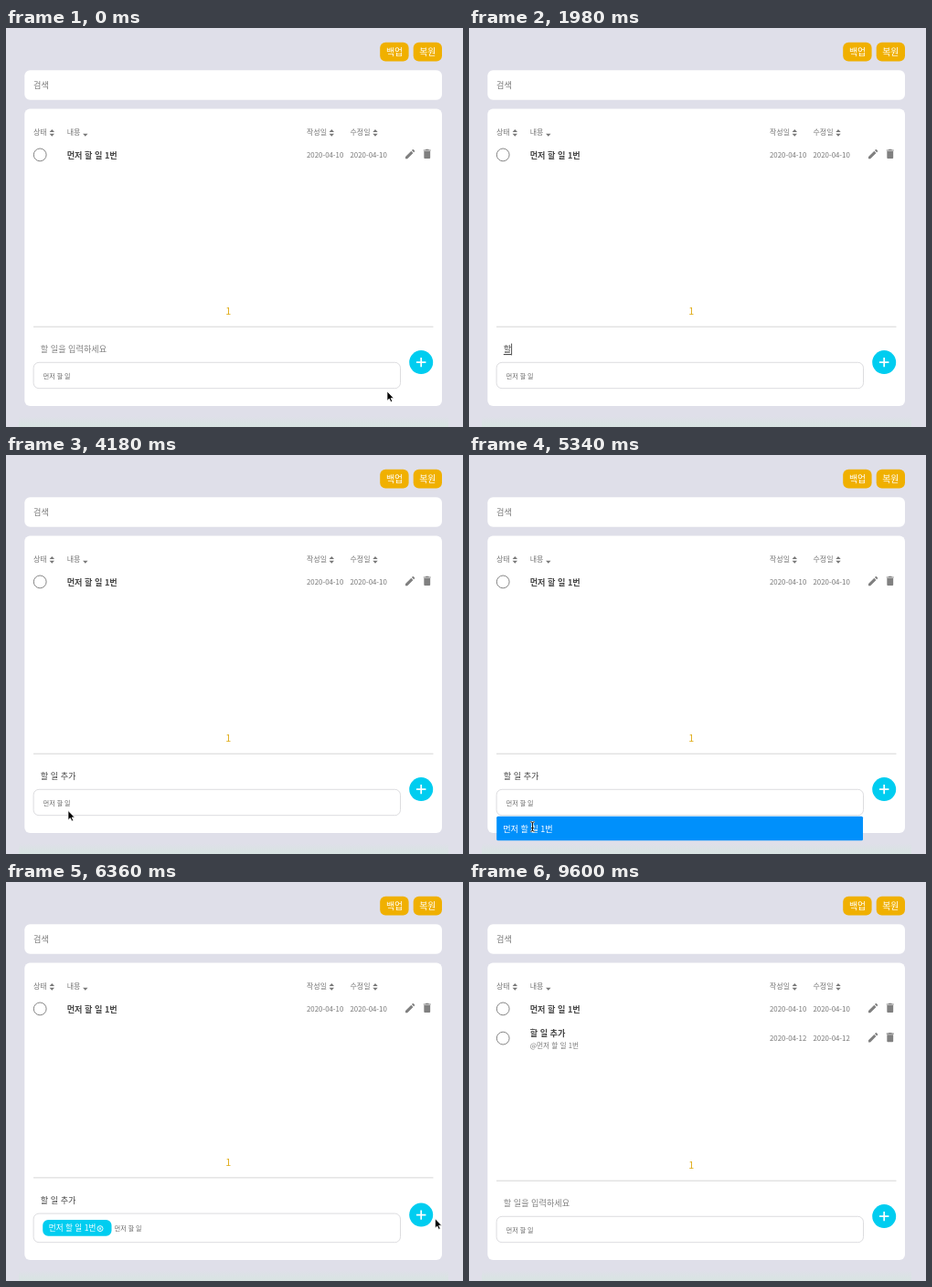
Write an HTML page that moves like this. It is 500 by 437 pixels and loops after 9820 ms.

```html
<!DOCTYPE html>
<html lang="ko">
<head>
<meta charset="utf-8">
<title>할 일</title>
<style>
html, body { margin: 0; width: 100%; height: 100%; overflow: hidden; background: #dfdfe9; }
svg { display: block; width: 100%; height: 100%; }
text { font-family: 'Noto Sans CJK KR', 'Noto Sans CJK', 'Noto Sans CJK JP', sans-serif; white-space: pre; }
</style>
</head>
<body>
<svg id="stage" viewBox="0 0 500 437"></svg>
<script>
const LOOP = 9820;
const CYAN = '#00cdf0', AMBER = '#f0b000', GRAY = '#777';
const stage = document.getElementById('stage');
const $ = id => document.getElementById(id);

// Text is placed by its left edge and vertical middle.
const text = (x, middle, size, content, fill = GRAY, extra = '') =>
  `<text x="${x}" y="${middle + size * 0.37}" font-size="${size}" fill="${fill}" ${extra}>${content}</text>`;
const box = (x, y, w, h, r, fill, extra = '') =>
  `<rect x="${x}" y="${y}" width="${w}" height="${h}" rx="${r}" fill="${fill}" ${extra}/>`;
const button = (x, w, label) =>
  box(x, 15.7, w, 20.8, 6, AMBER) + text(x + w / 2, 26.2, 9.8, label, '#fff', 'text-anchor="middle"');
const sortIcon = (x, both = true) =>
  `<path fill="${GRAY}" d="M${x - 2.7} 115.7h5.4l-2.7 3z${both ? `M${x - 2.7} 114.1h5.4l-2.7 -3z` : ''}"/>`;

const EDIT = 'M3 17.25V21h3.75L17.81 9.94l-3.75-3.75L3 17.25zM20.71 7.04c.39-.39.39-1.02 0-1.41l-2.34-2.34c-.39-.39-1.02-.39-1.41 0l-1.83 1.83 3.75 3.75 1.83-1.83z';
const TRASH = 'M6 19c0 1.1.9 2 2 2h8c1.1 0 2-.9 2-2V7H6v12zM19 4h-3.5l-1-1h-5l-1 1H5v2h14V4z';
const icon = (x, y, path) => `<path transform="translate(${x} ${y}) scale(.571)" fill="#808080" d="${path}"/>`;

function row(y, title, date, note) {
  return `<circle cx="37.2" cy="${y - 0.4}" r="6.9" fill="none" stroke="#858585"/>` +
    text(66.7, note ? y - 6 : y, 9.13, title, '#444', 'font-weight="700"') +
    (note ? text(66.7, y + 7.5, 7.7, note) : '') +
    text(329, y, 7.85, date) + text(376.5, y, 7.85, date) +
    icon(435.3, y - 8.1, EDIT) + icon(453.9, y - 8.2, TRASH);
}

stage.innerHTML = `
  <defs>
    <linearGradient id="fade" x2="0" y2="1">
      <stop offset="0" stop-color="#d8e4e2" stop-opacity="0"/>
      <stop offset="1" stop-color="#d8e4e2"/>
    </linearGradient>
  </defs>
  ${box(0, 0, 500, 437, 0, '#dfdfe9')}
  ${box(14, 425, 470, 12, 0, 'url(#fade)')}
  ${button(409.2, 31.4, '백업')}${button(445.7, 31.3, '복원')}
  ${box(20.3, 46.3, 456.7, 32.4, 6, '#fff')}
  ${text(30, 62.8, 9.13, '검색')}
  ${box(20.3, 88.5, 456.7, 325.5, 6, '#fff')}
  ${text(30, 114.5, 8, '상태')}${sortIcon(50.3)}
  ${text(66.7, 114.5, 8, '내용')}${sortIcon(86.8, false)}
  ${text(329, 114.5, 8, '작성일')}${sortIcon(356.3)}
  ${text(376.5, 114.5, 8, '수정일')}${sortIcon(404)}
  ${row(139.3, '먼저 할 일 1번', '2020-04-10')}
  <g id="added">${row(171.5, '할 일 추가', '2020-04-12', '@먼저 할 일 1번')}</g>
  <g id="upper">
    ${text(243.2, 309.9, 10.8, '1', '#e0ae1c', 'text-anchor="middle" font-weight="500"')}
    <path d="M30 327.2H467.5" stroke="#d2d2d2" stroke-width=".9"/>
    ${text(37.8, 352, 9.13, '할 일을 입력하세요', '#808080', 'id="hint"')}
    ${text(37.8, 352, 9.13, '', '#444', 'id="typed"')}
    <path id="underline" stroke="#222" stroke-width=".9"/>
    <path id="caret" stroke="#222" stroke-width=".8"/>
  </g>
  <rect id="field" x="30.1" width="401.4" rx="6" fill="#fff" stroke="#d9d9dc" stroke-width=".9"/>
  <g id="chip">
    ${box(40.2, 370, 75.3, 17.8, 6, CYAN)}
    ${text(46.8, 379, 8.6, '먼저 할 일 1번', '#fff')}
    <g fill="none" stroke="#fff" stroke-width=".9"><circle cx="103" cy="379.6" r="3"/><path d="M101.7 378.3l2.6 2.6m0-2.6l-2.6 2.6"/></g>
  </g>
  <g id="tagHint">${text(0, 0, 7, '먼저 할 일', '#666')}</g>
  <g id="plus">
    <circle cx="454.2" cy="366.1" r="13" fill="${CYAN}"/>
    <path d="M449 366.1h10.4M454.2 360.9v10.4" stroke="#fff" stroke-width="1.7"/>
  </g>
  <g id="menu">
    ${box(30.2, 395.8, 400.8, 26.4, 1.5, '#0090fb')}
    ${text(37.2, 409.3, 9.1, '먼저 할 일 1번', '#fff')}
  </g>
  <g id="pointer" stroke-linejoin="round">
    <path id="arrow" d="M0 0V10.2L2.3 8.1 4 11.6 5.7 10.8 4.1 7.4H7.2Z" fill="#000" stroke="#fff" stroke-width=".7"/>
    <g id="beam" fill="none">
      <path d="M-2.2-5.2Q0-5.2 0-4V4Q0 5.2-2.2 5.2M2.2-5.2Q0-5.2 0-4V4Q0 5.2 2.2 5.2M-1.4 1.6H1.4" stroke="#fff" stroke-width="2.2"/>
      <path d="M-2.2-5.2Q0-5.2 0-4V4Q0 5.2-2.2 5.2M2.2-5.2Q0-5.2 0-4V4Q0 5.2 2.2 5.2M-1.4 1.6H1.4" stroke="#111" stroke-width="1"/>
    </g>
    <path id="hand" d="M-.9 5.5V.8Q0-.6.9.8V4.2L4.6 5Q5.6 5.3 5.4 6.5L4.6 10.6H-.7L-3.4 6.6Q-3.2 5.4-2 6Z" fill="#fff" stroke="#000" stroke-width=".8"/>
  </g>`;

// Pointer way points: time, x, y.
const PATH = [
  [0, 417, 398], [280, 417, 398], [720, 54, 336], [860, 62.7, 350], [940, 63, 351],
  [3560, 63, 351], [4180, 68, 389.5], [4800, 68, 389.5], [5340, 69.5, 407], [5660, 69.5, 407],
  [6200, 479, 375], [6360, 469.5, 368.8], [6600, 461, 367.5], [8380, 461, 367.5], [8560, 319, -14]
];
const TYPING = [
  [0, ''], [1680, 'ㅎ'], [1800, '하'], [1980, '할'], [2220, '할 '], [2320, '할 ㅇ'], [2420, '할 이'],
  [2520, '할 일'], [2620, '할 일 '], [2780, '할 일 ㅊ'], [2900, '할 일 추'], [3040, '할 일 추ㄱ'],
  [3120, '할 일 추가'], [6920, '']
];
const FOCUS = 1100, BLUR = 4180, OPEN = 4360, PICK = 5460, ADD = 6920;

const show = (id, visible) => $(id).setAttribute('visibility', visible ? 'visible' : 'hidden');
const move = (id, x, y) => $(id).setAttribute('transform', `translate(${x} ${y})`);
const between = (t, from, to) => t >= from && t < to;

function pointerAt(t) {
  const next = PATH.findIndex(point => point[0] > t);
  const [t0, x0, y0] = PATH[next - 1], [t1, x1, y1] = PATH[next];
  const p = (t - t0) / (t1 - t0), eased = p * p * (3 - 2 * p);
  return [x0 + (x1 - x0) * eased, y0 + (y1 - y0) * eased];
}

function drawPointer(t, menuOpen) {
  const visible = t < 8560 && !between(t, 1680, 3560);
  let kind = '';
  if (visible) {
    const [x, y] = pointerAt(t);
    const overText = x < 432 && between(y, 334, 364) || menuOpen && y > 398;
    kind = overText ? 'beam' : Math.hypot(x - 454.2, y - 366) < 13 ? 'hand' : 'arrow';
    move('pointer', x, y);
  }
  for (const id of ['arrow', 'beam', 'hand']) show(id, id === kind);
}

function drawTyping(t) {
  const value = TYPING.findLast(step => step[0] <= t)[1];
  const focused = between(t, FOCUS, BLUR);
  const advance = s => [...s].reduce((sum, c) => sum + (c === ' ' ? 0.224 : 0.92), 0) * 9.13;
  const end = 37.8 + advance(value);
  $('typed').textContent = value;
  show('hint', !value);
  show('caret', focused);
  show('underline', focused && value && !value.endsWith(' '));
  $('caret').setAttribute('d', `M${end + 0.4} 345.6V358.4`);
  $('underline').setAttribute('d', `M${end - 8.4} 357.6H${end}`);
}

function draw(t) {
  const picked = between(t, PICK, ADD), menuOpen = between(t, OPEN, PICK);
  const top = picked ? 363.1 : 366.3;
  show('added', t >= ADD);
  show('chip', picked);
  show('menu', menuOpen);
  move('upper', 0, picked ? -3.3 : 0);
  move('plus', 0, picked ? -1.5 : 0);
  move('tagHint', picked ? 118.8 : 40.8, picked ? 379.2 : 381);
  $('field').setAttribute('y', top);
  $('field').setAttribute('height', 394.7 - top);
  drawTyping(t);
  drawPointer(t, menuOpen);
}

const start = performance.now();
function tick() {
  draw((performance.now() - start) % LOOP);
  requestAnimationFrame(tick);
}
tick();
</script>
</body>
</html>
```
